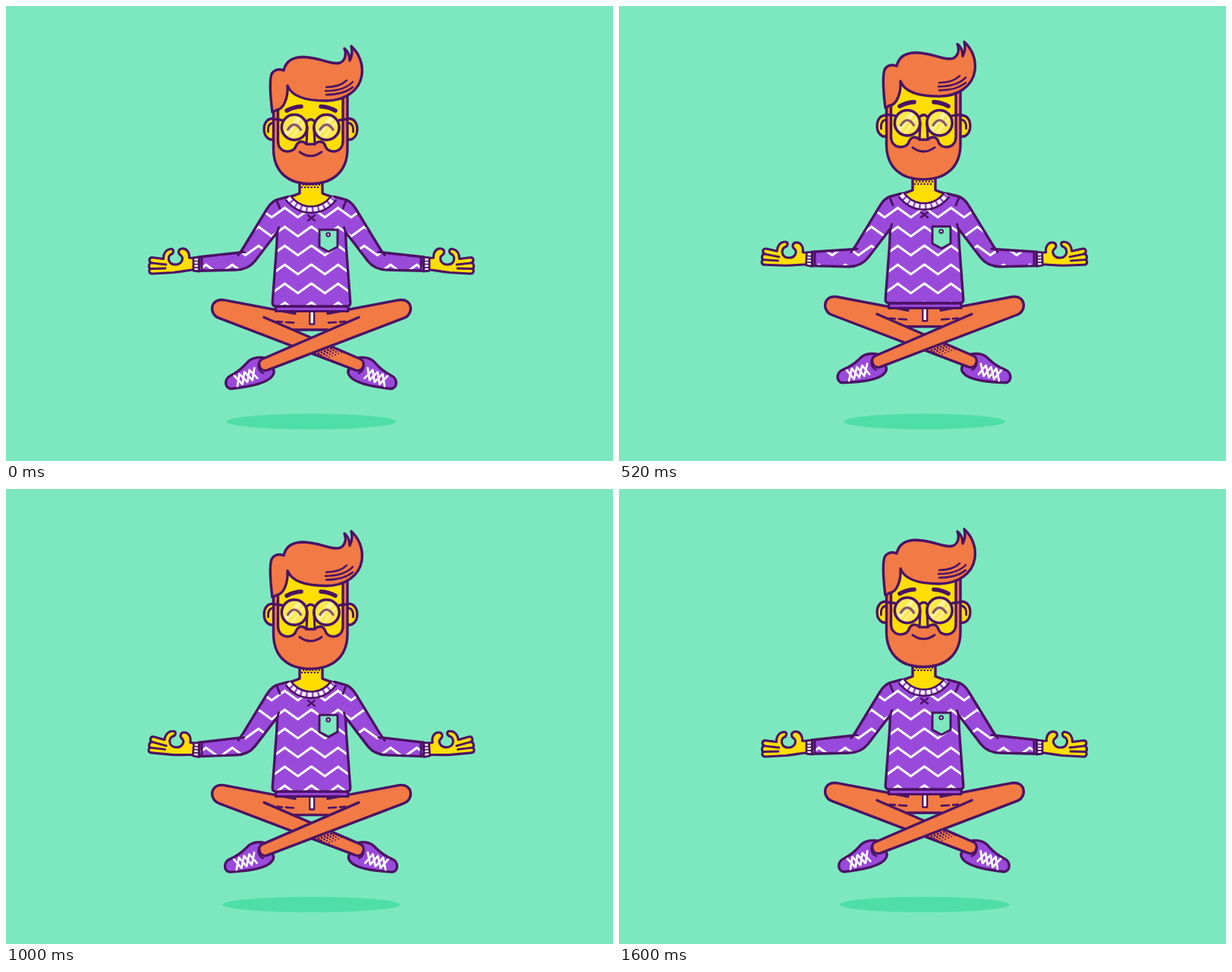
An HTML page with a canvas for the animation above (1.64 s loop, 800 by 600 pixels).

```html
<!DOCTYPE html>
<html lang="en">
<head>
<meta charset="utf-8">
<title>Levitating meditation</title>
<style>
html, body { margin: 0; width: 100%; height: 100%; overflow: hidden; background: #7de8bf; }
canvas { display: block; width: 800px; height: 600px; }
</style>
</head>
<body>
<canvas id="stage" width="800" height="600"></canvas>
<script>
const ctx = document.getElementById('stage').getContext('2d');
const MINT = '#7de8bf', SHADE = '#4fdea9', INK = '#4b1264', ORANGE = '#f27a45',
      SKIN = '#ffde00', PURPLE = '#9a4adb', WHITE = '#fff';
const LOOP = 1640, CYCLE = 1600, STEP = 40, AXIS = 402;

// Poses of each part over one floating cycle
const times = [0, 200, 360, 680, 1000, 1320];
const tracks = {
  head:   [0, -4.2, -6.8, -3.8, 2.7, 4.9],
  body:   [0, -3.6, -5.3, -2.3, 2.9, 4.2],
  cuff:   [0, -0.9, -1.5, -2.9, 0.4, 1.8],
  hand:   [0, 1.1, 2.9, 7, 8.5, 4],
  foot:   [0, 1, 3, 5.2, 3, 0],
  shadow: [112, 107, 105, 109, 117, 118]
};

// Smooth periodic curve through the poses
function at(values, t) {
  const n = times.length;
  const wrap = i => (i + n) % n;
  const time = i => times[wrap(i)] + Math.floor(i / n) * CYCLE;
  const val = i => values[wrap(i)];
  const slope = i => (val(i + 1) - val(i - 1)) / (time(i + 1) - time(i - 1));
  let i = 0;
  while (time(i + 1) <= t) i++;
  const d = time(i + 1) - time(i), u = (t - time(i)) / d, u2 = u * u, u3 = u2 * u;
  return (2 * u3 - 3 * u2 + 1) * val(i) + (u3 - 2 * u2 + u) * d * slope(i)
    + (3 * u2 - 2 * u3) * val(i + 1) + (u3 - u2) * d * slope(i + 1);
}

const path = d => d instanceof Path2D ? d : new Path2D(d);
function fill(d, color) {
  ctx.fillStyle = color;
  ctx.fill(path(d));
}
function line(d, width = 3.4, color = INK) {
  ctx.lineWidth = width;
  ctx.strokeStyle = color;
  ctx.stroke(path(d));
}
function shape(d, color, width) {
  const p = path(d);
  fill(p, color);
  line(p, width);
}
function dot(x, y, r, color = INK) {
  ctx.fillStyle = color;
  ctx.beginPath();
  ctx.arc(x, y, r, 0, 7);
  ctx.fill();
}
function group(fn, dx = 0, dy = 0) {
  ctx.save();
  ctx.translate(dx, dy);
  fn();
  ctx.restore();
}
function flip(fn, axis = AXIS) {
  group(() => { ctx.scale(-1, 1); fn(); }, axis * 2);
}
function both(fn, axis) {
  group(fn);
  flip(fn, axis);
}
function turn(deg, x, y) {
  ctx.translate(x, y);
  ctx.rotate(deg * Math.PI / 180);
  ctx.translate(-x, -y);
}

function shoe(deg) {
  turn(deg, 343, 474);
  shape('M352 470C346 461.500 328 461.500 320 468C314 474 311 480 296 487.500C287.500 491 287.500 504.500 297 504.700C318 502 338 499 348 491C355 485 354 480 350 476Z', PURPLE);
  for (const side of [-1, 1]) {
    const lace = new Path2D();
    for (let i = 0; i < 5; i++) {
      const s = (i % 2 ? 1 : -1) * side * 6.8;
      lace.lineTo(303 + i * 6.6 + s * 0.3, 494.5 - i * 2.6 + s);
    }
    line(lace, 2.7, WHITE);
  }
  shape('M341 465C331 466 330 480 339 484', WHITE, 3);
}

const leg = new Path2D('M381 405.500L287 387.700C268.500 385 267 407 281 411.700L461 480.300C471 483 475 469 467 465.500L340 410.500');

function halftone() {
  group(() => {
    ctx.clip(leg);
    for (let row = 0; row < 4; row++)
      for (let i = 0; i < 8; i++) {
        const a = i * 4.4 + (row % 2) * 2.2, b = row * 3.2;
        dot(408 + a * 0.93 + b * 0.37, 460 - a * 0.37 + b * 0.93, 1.55 - row * 0.2);
      }
  });
}

function legs(deg) {
  both(() => shoe(deg));
  fill('M340 410L381 405V397H423V405L464 410L427 427H377Z', ORANGE);
  line('M380 427H424');
  shape(leg, ORANGE);
  halftone();
  flip(() => shape(leg, ORANGE), 402.5);
  both(() => line('M357 416L364 416.600M369 417L379 417.600', 2.6));
  line('M400.500 403V419.500H406V403', 2.6);
  fill('M401.500 404H405V418.300H401.500Z', WHITE);
  shape('M355.500 396H451V402.500H355.500Z', PURPLE, 3.2);
}

function hand(deg, k) {
  group(() => {
    ctx.translate(0, k);
    turn(deg, 249, 340);
    shape('M249 332.500L241.500 332C242 324 237 319 231.500 320C226 321 227 327 230 328.500C235 332 232 341 223 341C213.500 341 213 331.500 216.500 328C222 326 222 319.500 216.500 320.500C210 321.500 207 328 207.500 333.500L194 331.700C188 331 187.500 337.500 192 338.800C187.500 339 187.500 346 191 346.500C187.500 347 188 353.300 193 353L220 351.500C232 350.500 238 348.500 249 347.500Z', SKIN, 3.1);
    line('M192 338.800L211 341M191 346.500L210 346', 2.8);
  });
  group(() => {
    turn(deg / 2, 254, 340);
    shape('M247 332L255 331V350L247 349Z', WHITE, 2.8);
    line('M247 336.500H254M247 340.500H254M247 344.800H254', 1.7);
  }, 0, k);
}

function shirtHalf(dy, k) {
  const edge = `M403 396H356Q351 396 351.200 391L356.500 320L357.500 298L328 336.500Q319 347.700 303 348L254.500 ${349.3 + k}V${331 + k}L309 325L344 267.500Q350.500 256.500 360 254.700L372 251.500`;
  const body = new Path2D(edge + 'Q384 270 403 270Z');
  fill(body, PURPLE);
  group(() => {
    ctx.clip(body);
    ctx.lineJoin = 'miter';
    for (let y = 266.2; y < 400; y += 25) {
      const zig = new Path2D();
      for (let i = -1; i < 10; i++) zig.lineTo(AXIS - i * 17.3, y - dy + (i & 1 ? 12.5 : 0));
      line(zig, 3, WHITE);
    }
  });
  line(edge);
  line(`M306 328.500L311 321.500M309 325L314 324.500M357.500 299L359.500 292M357 257L361 267M258 ${332 + k * 0.95}V${348.500 + k * 0.95}`, 3);
}

function neckHalf() {
  fill('M387 222V246Q380 251 370 252Q384 268 402 268V222Z', SKIN);
  line('M387 222V247Q382 249.500 370 252.500');
}

function collar() {
  const rib = new Path2D('M372 253Q384 268.500 402 268.500Q420 268.500 432 253');
  ctx.lineCap = 'butt';
  line(rib, 11);
  line(rib, 5.6, PURPLE);
  ctx.setLineDash([5, 2.7]);
  line(rib, 5.6, WHITE);
  ctx.setLineDash([]);
  ctx.lineCap = 'round';
  line('M398 276L407 283M407 276L398 283', 2.4);
}

function pocket() {
  shape('M413 295H437V317.500L425 324L413 317.500Z', MINT, 3);
  dot(424.7, 301.5, 3.3);
  dot(424.7, 301.5, 1.2, WHITE);
}

function lens(x) {
  const rim = new Path2D();
  rim.arc(x, 160, 16.7, 0, 7);
  group(() => {
    ctx.clip(rim);
    fill(rim, 'rgba(255,255,255,.3)');
    ctx.lineCap = 'butt';
    line(`M${x - 14} 173L${x + 11} 142`, 5.5, 'rgba(255,255,255,.5)');
    line(`M${x - 7} 178L${x + 16} 149`, 2.4, 'rgba(255,255,255,.5)');
  });
  line(`M${x - 8.5} 163Q${x} 150 ${x + 8.5} 163`, 3.3, '#87586c');
  line(rim, 3.6);
}

function head() {
  fill('M353 100H450V200H353Z', SKIN);
  shape('M352.500 136V188C352.500 219 372 234.500 401 234.500C430 234.500 450 219 450 188V116H444V178C444 195 424 195 421 185C419 178 412 177 407 182H396C391 177 385 178 382 185C379 195 358.500 195 358.500 178V136Z', ORANGE);
  shape('M397 160L396 182H407L406 160', SKIN, 3.2);
  line('M387 192.500Q401 203 416 192.500', 3);
  line('M370 138Q379 133 389 132.500M415 132.500Q425 133 434 138', 5.6);
  lens(380);
  lens(422.5);
  line('M396.500 152Q401.500 147 406.500 152M363.500 150.500L352 149M439.500 150.500L451 149', 3.4);
  shape('M351 140C349 124 347 108 349 94C350 85 358 82 366 85C369 71 380 67.300 392 67.300C415 68 428 78 440 75C447 72 449 64 446 56C450 59 453 65 453 72C456 66 457 60 455 53C465 62 471 76 469 91C466 112 446 125 422 125C398 125 377 121 371 105C372 121 366 136 357 137Z', ORANGE);
  line('M422 107Q440 107 449 98M421 112Q446 112 457 100M422 117Q445 117 457 107', 2.5);
}

function ear() {
  shape('M354 149C336 144 335 180 354 176', SKIN);
  line('M345.500 166Q344.500 155 352 154', 2.8);
}

function draw(t) {
  const pose = {};
  for (const name in tracks) pose[name] = at(tracks[name], t);

  ctx.fillStyle = MINT;
  ctx.fillRect(0, 0, 800, 600);
  ctx.lineCap = ctx.lineJoin = 'round';
  ctx.fillStyle = SHADE;
  ctx.beginPath();
  ctx.ellipse(402.5, 548, pose.shadow, 10.2, 0, 0, 7);
  ctx.fill();

  group(() => {
    legs(pose.foot);
    both(() => {
      hand(pose.hand, pose.cuff);
      shirtHalf(pose.body, pose.cuff);
    }, 402.5);
    both(neckHalf);
    for (let row = 0; row < 3; row++)
      for (let x = 390 + (row % 2) * 2; x < 415; x += 4.2) dot(x, 232.6 + row * 3.2, 1.25);
    collar();
    pocket();
    both(ear, 401.5);
  }, 0, pose.body);
  group(head, 0, pose.head);
}

function tick(now) {
  const t = Math.floor(now % LOOP / STEP) * STEP;
  draw(t % CYCLE);
  requestAnimationFrame(tick);
}
draw(0);
requestAnimationFrame(tick);
</script>
</body>
</html>
```
